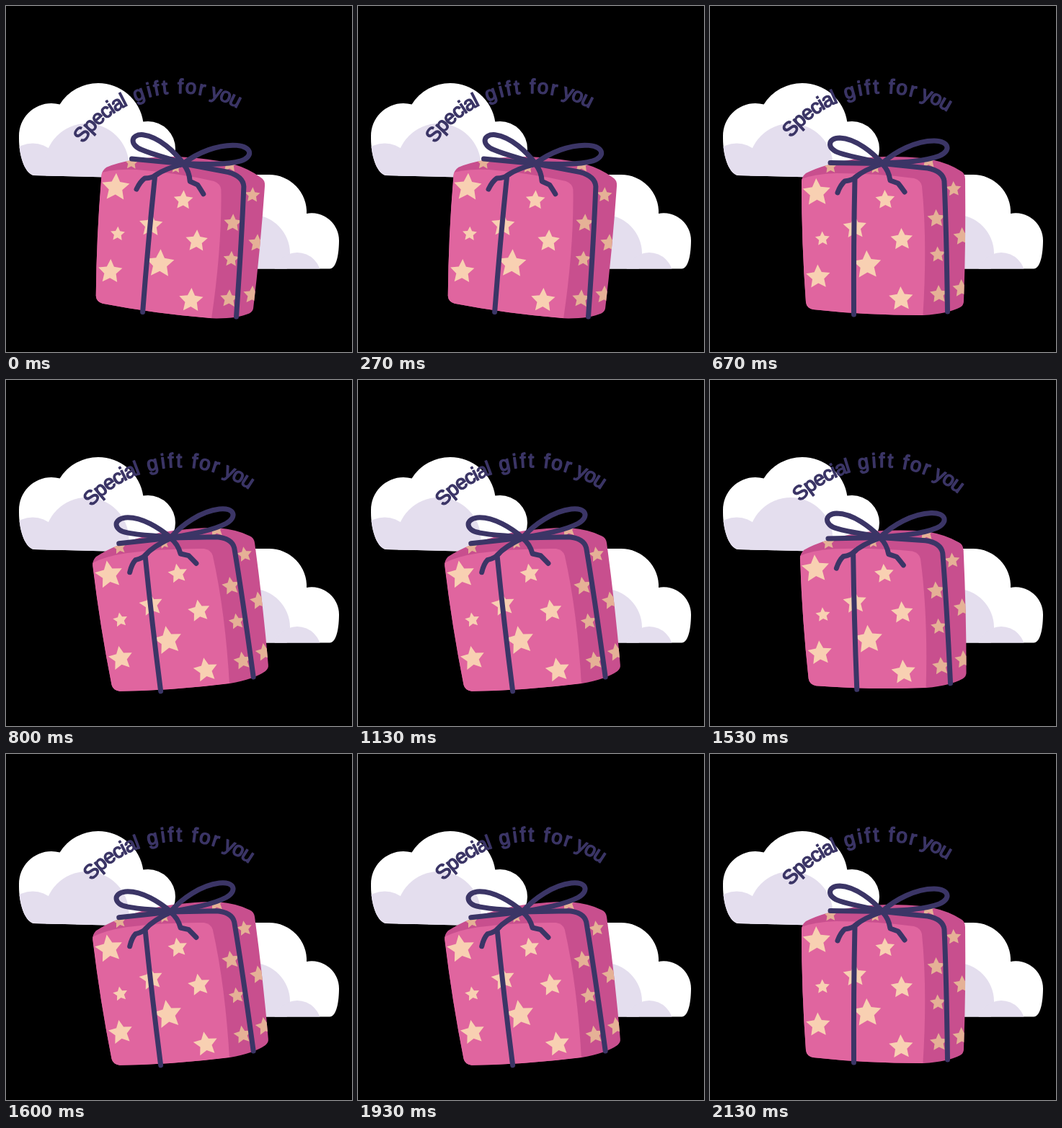
Animation of 480 by 480 pixels, one loop 2390 ms. Source, as an HTML page:

```html
<!DOCTYPE html>
<html lang="en">
<head>
<meta charset="utf-8">
<title>Special gift for you</title>
<style>
html, body { margin: 0; height: 100%; overflow: hidden; background: #000; }
svg { display: block; width: 100vw; height: 100vh; }
text { font: 28px "Liberation Sans", Arial, sans-serif; fill: #3b3566; stroke: #3b3566; stroke-width: 1.5; stroke-linejoin: round; }
.white { fill: #fff; }
.shade { fill: #e4deee; }
.ribbon { fill: none; stroke: #3b3566; stroke-width: 7; stroke-linecap: round; stroke-linejoin: round; }
</style>
</head>
<body>
<svg viewBox="0 0 480 480">
  <defs>
    <clipPath id="leftCloud">
      <path d="M18 184C18 206 25 231 38 235L140 237.5H200V180H18Z"/>
      <circle cx="63" cy="180" r="45"/>
      <circle cx="128" cy="170" r="63"/>
      <circle cx="197" cy="198" r="38"/>
    </clipPath>
    <clipPath id="rightCloud">
      <path d="M320 234H365A52 52 0 0 1 417 288A38 38 0 0 1 462 325C462 343 459 364 449 364.5H320Z"/>
    </clipPath>
    <path id="boxShape" d="M127 244Q127 237 133 232Q147 225 165 220Q205 209 245 209Q285 209 307 213Q331 218 348 229Q354 232 354 240Q355 330 352 410Q352 415 347 418Q330 427 296 429Q215 429 143 421Q134 419 133 411Q127 330 127 244Z"/>
    <clipPath id="boxClip"><use href="#boxShape"/></clipPath>
    <path id="arc" d="M99.8 202.5A163 163 0 0 1 382.2 202.5" fill="none"/>
  </defs>

  <g clip-path="url(#leftCloud)">
    <path class="white" d="M10 100H240V240H10Z"/>
    <circle class="shade" cx="37" cy="230" r="39.5"/>
    <circle class="shade" cx="112" cy="221.5" r="58.5"/>
  </g>
  <g clip-path="url(#rightCloud)">
    <path class="white" d="M320 230H470V370H320Z"/>
    <circle class="shade" cx="340" cy="343.5" r="54"/>
    <circle class="shade" cx="404" cy="375" r="33"/>
  </g>

  <g id="gift">
    <use href="#boxShape" fill="#c84f8e"/>
    <g clip-path="url(#boxClip)">
      <path fill="#e0659f" d="M120 243Q140 233 175 232Q231 232 283 239Q293 242 294 250Q302 330 295 435H120Z"/>
      <g id="stars"></g>
    </g>
    <g class="ribbon">
      <path d="M167 217.5L239 218.5L302 225Q323 229 325 243Q328 310 329.5 424"/>
      <path d="M239 219Q214 227 201 238Q199 330 199.500 428"/>
      <path d="M204 236Q198 242 187 243Q181 248 177 259"/>
      <path d="M239 219Q248 228 250 242L261 246Q265 251 270 258"/>
      <path d="M239 218C226 204 203 184 180 183C162 183 162 199 180 204C198 210 220 213 239 218"/>
      <path d="M239 218C257 202 285 187 311 187C332 187 335 201 318 208C297 216 264 217 239 218"/>
    </g>
  </g>

  <g id="title">
    <text letter-spacing="-1.4"><textPath href="#arc" startOffset="23">Special</textPath></text>
    <text letter-spacing="3.3"><textPath href="#arc" startOffset="117">gift</textPath></text>
    <text letter-spacing="2.2"><textPath href="#arc" startOffset="177">for</textPath></text>
    <text letter-spacing="-1.6"><textPath href="#arc" startOffset="222">you</textPath></text>
  </g>
</svg>
<script>
const $ = id => document.getElementById(id);

// x, y, radius
const frontStars = [[148, 259, 20], [243, 269, 14], [156, 323, 10.5], [201, 307, 17],
  [266, 324, 16], [218, 359.5, 20.5], [150, 376, 17.5], [265, 406.5, 17.5]];
const sideStars = [[338, 254, 11], [314, 295, 13], [350, 320, 13], [316, 345, 11.5],
  [317.5, 400, 13], [349, 392, 13], [167, 223, 10], [303, 214, 12], [229, 225, 8]];

function starPath([x, y, r]) {
  const points = Array.from({ length: 10 }, (_, i) => {
    const a = i * Math.PI / 5 - Math.PI / 2 - 0.04;
    const d = i % 2 ? r * 0.49 : r;
    return [x + d * Math.cos(a), y + d * Math.sin(a)].map(v => v.toFixed(1));
  });
  return "M" + points.join("L") + "Z";
}

const starGroup = (stars, color) => `<path fill="${color}" d="${stars.map(starPath).join("")}"/>`;
$("stars").innerHTML = starGroup(frontStars, "#f8d0b2") + starGroup(sideStars, "#e5b196");

const LOOP = 2390, HOLD = 400;
const order = [0, 1, 2, 3, 2, 1];
const giftTilt = [4.7, 0, -7, -2];
const titleTilt = [-3.3, 0, 3.3, 6.6];

function draw(now) {
  const pose = order[Math.floor(now % LOOP / HOLD)];
  $("gift").setAttribute("transform", `rotate(${giftTilt[pose]} 238 306)`);
  $("title").setAttribute("transform", `rotate(${titleTilt[pose]} 241 284)`);
}

const start = performance.now();
function tick() {
  draw(performance.now() - start);
  requestAnimationFrame(tick);
}
tick();
</script>
</body>
</html>
```
